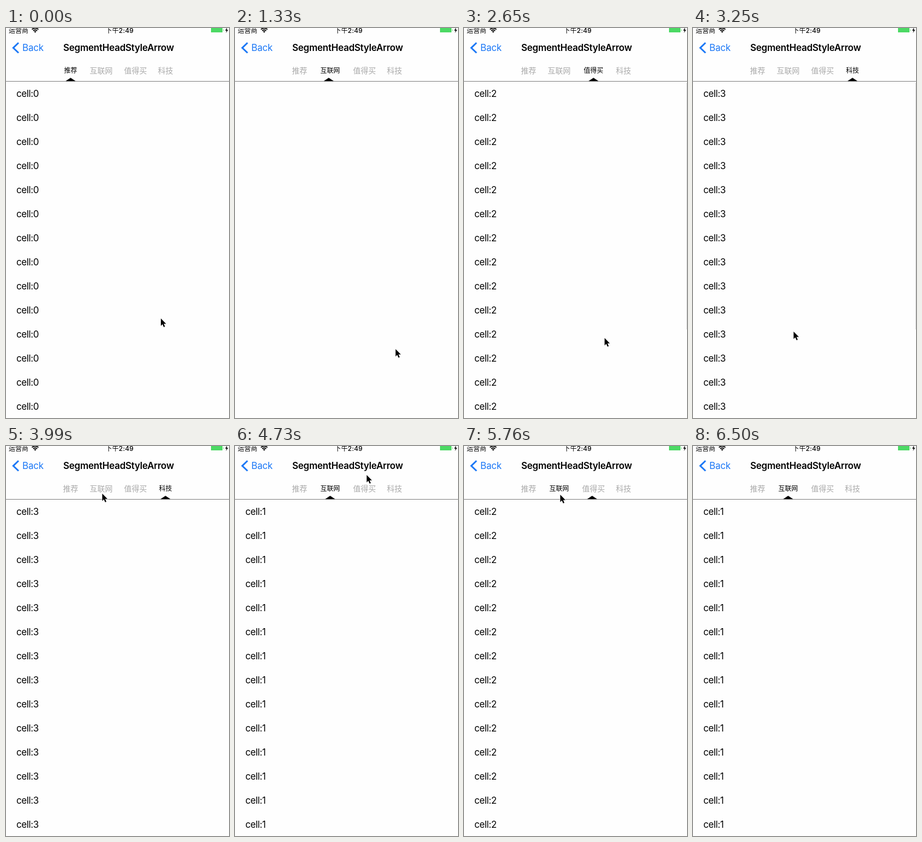
An HTML page that plays this animation: 409x713 px, repeating every 7250 ms.

```html
<!DOCTYPE html>
<html lang="zh-CN">
<head>
<meta charset="utf-8">
<title>Segmented pages</title>
<style>
  html, body { margin: 0; width: 100%; height: 100%; overflow: hidden; background: #fefefe; }
  svg { display: block; width: 409px; height: 713px; }
  text { font: 17px Inter, "Noto Sans CJK SC", sans-serif; }
  .title { font-weight: 600; letter-spacing: -.25px; text-anchor: middle; }
  .back { fill: #1c78f6; letter-spacing: -.2px; }
  .cell { letter-spacing: -.4px; }
  .status { font-size: 12px; }
  .time { font-weight: 500; letter-spacing: .2px; text-anchor: middle; }
  .tab { font: 14px "Noto Sans CJK SC", "Noto Sans CJK", sans-serif; fill: #aaa; text-anchor: middle; }
  .tab.on { font-size: 12px; fill: #000; }
</style>
</head>
<body>
<svg viewBox="0 0 409 713">
  <defs>
    <path id="pointer" d="M0 0V13.5l3-2.9 2.3 5.2 2.3-1-2.3-5H9.6z"/>
  </defs>
  <rect width="409" height="713" fill="#fefefe"/>
  <g id="pages"></g>
  <rect id="bar" x="408" y="100" width="1" height="451" fill="#d8d8d8"/>

  <text class="status" x="5" y="9">运营商</text>
  <g fill="none" stroke="#000" stroke-width="1.8">
    <path d="M47.5 2.6Q53.5-2.2 59.5 2.6M49.7 5Q53.5 2 57.3 5"/>
    <path d="M51.3 6.3Q53.5 4.8 55.7 6.3L53.5 8.8Z" fill="#000" stroke="none"/>
  </g>
  <text class="status time" x="208.3" y="9">下午2:49</text>
  <rect x="376" y="-2" width="21" height="10" fill="#4cd964"/>
  <path d="M398.5 2q2 1.5 0 4.5z" fill="#4cd964"/>
  <path d="M405.5-1L402 4.8h2.5L403.5 9l4-5.7h-2.6z"/>

  <path d="M23 27L13.3 36.3 23 45.5" fill="none" stroke="#1c78f6" stroke-width="3"/>
  <text class="back" x="30" y="42">Back</text>
  <text class="title" x="206.5" y="42">SegmentHeadStyleArrow</text>
  <g id="tabs"></g>
  <rect y="97" width="409" height="1" fill="#7c7c7c"/>
  <path id="arrow" d="M-9 97L0 91 9 97Z"/>

  <g id="cursor">
    <use href="#pointer" x="1" y="2" opacity=".25"/>
    <use href="#pointer" x=".5" y="1" stroke="#fff" stroke-width="1.6" paint-order="stroke"/>
  </g>
</svg>
<script>
const LOOP = 7250, STEP = 147.7, LEAD = 7, PAGE = 414, ROWS = 14;
const GLIDE = 3;
const tabNames = ["推荐", "互联网", "值得买", "科技"];
const tabX = [118.5, 174.5, 237.5, 292.5];

// Page changes: three swipes, then three taps
const moves = [
  { at: 7, to: 1 }, { at: 12, to: 2 }, { at: 18, to: 3 },
  { at: 28, to: 1 }, { at: 34, to: 2 }, { at: 39, to: 1 }
];

// Where the pointer turns: [step, x, y]
const turns = [
  [0, 283.5, 530], [2, 286, 530], [4, 306, 520], [7, 316, 580], [9, 294, 586],
  [12, 300, 590], [15, 208, 571], [18, 282, 563], [22, 184, 554],
  [27, 176, 86], [32, 241, 52], [34, 236, 82], [39, 176, 88], [43, 385, 640]
];

const svgNS = "http://www.w3.org/2000/svg";
const byId = id => document.getElementById(id);
const pagesBox = byId("pages"), tabsBox = byId("tabs");
const arrow = byId("arrow"), cursor = byId("cursor"), bar = byId("bar");

function add(parent, tag, attrs = {}, text = "") {
  const node = document.createElementNS(svgNS, tag);
  for (const name in attrs) node.setAttribute(name, attrs[name]);
  node.textContent = text;
  return parent.appendChild(node);
}

const pages = tabNames.map((_, page) => {
  const group = add(pagesBox, "g");
  for (let row = 0; row < ROWS; row++)
    add(group, "text", { class: "cell", x: 19, y: 126 + row * 44 }, "cell:" + page);
  return group;
});
const tabs = tabNames.map((name, i) => add(tabsBox, "text", { x: tabX[i] }, name));

const show = (node, on) => node.setAttribute("visibility", on ? "visible" : "hidden");
const place = (node, x, y = 0) => node.setAttribute("transform", `translate(${x} ${y})`);
const mix = (a, b, p) => a + (b - a) * p;
const clamp = p => Math.min(Math.max(p, 0), 1);
const easeOut = p => 1 - (1 - p) ** 2.7;

const scrollAt = step => moves.reduce(
  (page, { at, to }) => mix(page, to, easeOut(clamp((step - at) / GLIDE))), 0);

// Rows load one step after a page is first reached
const loadStep = page => page ? moves.find(move => move.to === page).at + GLIDE + 1 : -GLIDE;

function tabCentre(page) {
  const left = Math.min(Math.floor(page), tabX.length - 2);
  return mix(tabX[left], tabX[left + 1], page - left);
}

function pointerAt(step) {
  const next = turns.findIndex(turn => turn[0] > step);
  const [endStep, endX, endY] = turns.at(next);
  if (next < 0) return [endX, endY];
  const [fromStep, x, y] = turns[next - 1];
  const p = (step - fromStep) / (endStep - fromStep);
  return [mix(x, endX, p), mix(y, endY, p)];
}

function draw(time) {
  const step = Math.floor((time % LOOP + LEAD) / STEP);
  const scroll = scrollAt(step);
  const selected = moves.reduce((tab, { at, to }) => step >= at ? to : tab, 0);
  const age = tabNames.map((_, i) => step - loadStep(i));

  pages.forEach((node, i) => {
    place(node, (i - scroll) * PAGE);
    show(node, age[i] >= 0 && Math.abs(i - scroll) < 1);
  });
  tabs.forEach((node, i) => {
    node.setAttribute("class", i === selected ? "tab on" : "tab");
    node.setAttribute("y", i === selected ? 82 : 82.8);
  });

  // The marker runs slightly ahead of the pages
  place(arrow, tabCentre(scrollAt(step + .045)));

  // The scroll bar flashes when rows load
  show(bar, age.some(steps => steps === 0 || steps === 1));

  // The pointer first moves on every second step
  place(cursor, ...pointerAt(step < 6 ? step - step % 2 : step));
  show(cursor, step < 44);
}

const start = performance.now();
function tick() {
  draw(performance.now() - start);
  requestAnimationFrame(tick);
}
tick();
</script>
</body>
</html>
```
